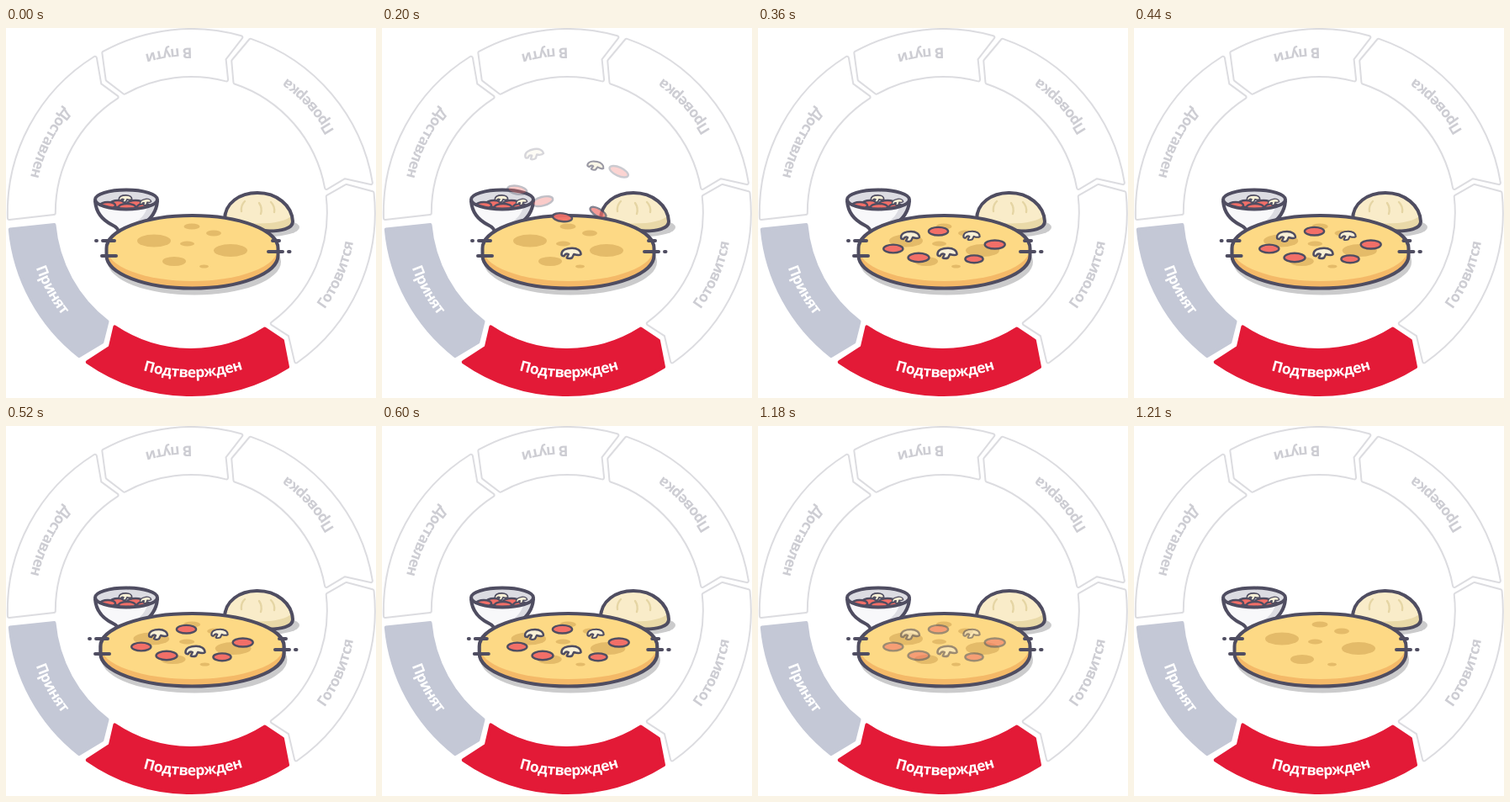
An HTML page that plays this animation: 440 px wide and 440 px high, repeating every 1.24 s.

```html
<!DOCTYPE html>
<html lang="ru">
<head>
<meta charset="utf-8">
<style>
html, body { margin: 0; width: 100%; height: 100%; overflow: hidden; background: #fff; }
svg { display: block; width: 100vw; height: 100vh; }
text { font: 700 17.4px "Open Sans", "Noto Sans", sans-serif; letter-spacing: -0.45px; text-anchor: middle; }
.ink { stroke: #4f4d61; stroke-width: 4; stroke-linecap: round; stroke-linejoin: round; }
.thin { stroke: #4f4d61; stroke-width: 2.4; stroke-linejoin: round; }
.red { fill: #f26f68; }
.cream { fill: #f8f0d6; }
.shadow { fill: #cbcbcc; }
.keep { vector-effect: non-scaling-stroke; }
</style>
</head>
<body>
<svg viewBox="0 0 440 440">
  <defs>
    <path id="line" d="M24.3 219.5A196 196 0 0 0 416.3 219.5"/>
    <path id="mushroom" class="cream thin" d="M-11 1C-11-4-5-6 1-6S11-3 11 1C9 3 6 2 3 1L1 5C-1 6-4 6-5 5L-3 1C-5 0-7 1-8 3C-10 3-11 2-11 1Z"/>
    <path id="bun" d="M260 228C260 208 278 196 299 196C322 196 340 211 341 230C341 239 326 241.500 313 241.500L275 238C264 236 260 232 260 228Z"/>
    <clipPath id="bunClip"><use href="#bun"/></clipPath>
    <clipPath id="bowlClip"><ellipse cx="143" cy="204" rx="37" ry="11.5"/></clipPath>
    <path id="base" d="M119.5 262A102 39 0 0 1 323.5 262V270.500A102 39 0 0 1 119.5 270.500Z"/>
  </defs>

  <g id="ring"></g>

  <g id="bowl">
    <ellipse class="shadow" cx="147" cy="232" rx="27" ry="7"/>
    <path d="M106 206C107 218 114 228 126 234Q134 238 134 243H155Q155 238 162 234C173 227 179 218 180 206Z" fill="#f8f8fa"/>
    <path d="M180 206C179 218 173 227 162 234H150C160 228 166 221 168 213Z" fill="#dcdce2"/>
    <path class="ink" d="M106 206C107 218 114 228 126 234Q134 238 134 243H155Q155 238 162 234C173 227 179 218 180 206" fill="none"/>
    <ellipse cx="143" cy="204" rx="37" ry="11.5" fill="#dcdce2"/>
    <g clip-path="url(#bowlClip)">
      <g class="red thin">
        <ellipse cx="133" cy="209" rx="9" ry="4"/>
        <ellipse cx="154" cy="209" rx="10" ry="4"/>
        <ellipse cx="121" cy="211" rx="9" ry="4"/>
        <ellipse cx="144" cy="213" rx="10" ry="4"/>
        <ellipse cx="164" cy="213" rx="8" ry="4"/>
      </g>
      <use href="#mushroom" transform="translate(142 203) scale(.7)"/>
      <use href="#mushroom" transform="translate(166 207) rotate(-10) scale(.6)"/>
    </g>
    <ellipse class="ink" cx="143" cy="204" rx="37" ry="11.5" fill="none"/>
  </g>

  <g id="dough">
    <ellipse class="shadow" cx="312" cy="237" rx="37" ry="11"/>
    <use href="#bun" fill="#f9ecc9"/>
    <path clip-path="url(#bunClip)" d="M344 218C338 231 314 234 285 232V246H348Z" fill="#e9d9a8"/>
    <path d="M284 206Q279 211 280 218M301 208Q305 214 303 221M315 207Q320 212 319 219" fill="none" stroke="#e5d5a4" stroke-width="2.4" stroke-linecap="round"/>
    <use href="#bun" class="ink" fill="none"/>
  </g>

  <g id="pizza">
    <ellipse class="shadow" cx="224" cy="278" rx="103" ry="39.5"/>
    <use href="#base" fill="#f4b968"/>
    <ellipse cx="221.5" cy="262" rx="102" ry="39" fill="#fdd985"/>
    <g fill="#e4bb69">
      <ellipse cx="176" cy="253" rx="20" ry="7.5"/>
      <ellipse cx="267" cy="264.5" rx="20" ry="7.5"/>
      <ellipse cx="200" cy="277.5" rx="14" ry="5.5"/>
      <ellipse cx="221" cy="236" rx="9.5" ry="3.6"/>
      <ellipse cx="247" cy="244" rx="9" ry="3.5"/>
      <ellipse cx="215.5" cy="256.5" rx="8.5" ry="3"/>
      <ellipse cx="235.5" cy="283.5" rx="5.5" ry="2"/>
    </g>
    <use href="#base" class="ink keep" fill="none"/>
  </g>
  <path id="left" class="ink" d="M107 253H108M115 253H129M114 271H131" fill="none"/>
  <path id="right" class="ink" d="M317 253H325M312 266H329M336 266H337.5" fill="none"/>
  <g id="toppings"></g>
</svg>

<script>
const LOOP = 1240, STEP = 40, REST = 680, FADE = 1180, CLEAR = 1210;
const CX = 220.3, CY = 219.5, R_IN = 163.5, R_MID = 187, R_OUT = 216.5;
const $ = id => document.getElementById(id);
const clamp = v => Math.max(0, Math.min(1, v));

function add(parent, tag, attrs) {
  const el = document.createElementNS("http://www.w3.org/2000/svg", tag);
  for (const k in attrs) el.setAttribute(k, attrs[k]);
  return parent.appendChild(el);
}

function at(r, deg) {
  const a = deg * Math.PI / 180;
  return (CX + r * Math.cos(a)).toFixed(2) + " " + (CY + r * Math.sin(a)).toFixed(2);
}

// Ring arrows run counterclockwise; a null end is cut straight.
function arrow(from, to) {
  const back = from === null
    ? [at(R_IN, 174.9), at(R_OUT, 174.7)]
    : [at(R_IN, from - 2.2), at(R_MID, from - 4.9), at(R_OUT, from - 1.2)];
  const front = to === null
    ? [at(R_OUT, 178.3), at(R_IN, 179.8)]
    : [at(R_OUT, to + 2), at(R_MID, to - 1.5), at(R_IN, to + 1.6)];
  return `M${back.join("L")}A${R_OUT} ${R_OUT} 0 0 0 ${front.join("L")}` +
    `A${R_IN} ${R_IN} 0 0 1 ${back[0]}Z`;
}

const GREY = "#c4c8d6", RED = "#e31a37", PALE = "#cdcdd3";
// label, label angle, start, end, solid colour
const stages = [
  ["Принят", 151, null, 126, GREY],
  ["Подтвержден", 89.4, 126, 56, RED],
  ["Готовится", 23.2, 56, -8.2],
  ["Проверка", -42.2, -8.2, -73],
  ["В пути", -98, -73, -120.7],
  ["Доставлен", -153.8, -120.7, null]
];
for (const [label, angle, from, to, solid] of stages) {
  const d = arrow(from, to), ring = $("ring");
  const layer = (color, width) => add(ring, "path", {
    d, fill: color, stroke: color, "stroke-width": width, "stroke-linejoin": "round"
  });
  if (solid) layer(solid, 4);
  else {
    layer("#dcdce0", 6);
    layer("#fff", 2);
  }
  const text = add(ring, "text", {
    fill: solid ? "#fff" : PALE, transform: `rotate(${angle - 90} ${CX} ${CY})`
  });
  add(text, "textPath", { href: "#line", startOffset: "50%" }).textContent = label;
}

// x, y, radius (0 = mushroom), scale, drop height, tilt, start, duration
const toppings = [
  [181, 248, 0, 1, 99, -10, 160, 180],
  [254, 247, 0, 0.88, 102, 15, 120, 140],
  [225, 268, 0, 1.05, 95, 12, 100, 100],
  [160.8, 262.5, 11.6, 1, 73, 10, 140, 170],
  [191, 273, 12.5, 1, 70, -15, 140, 170],
  [214.5, 241.7, 11.6, 1, 80, 35, 100, 108],
  [257, 274.8, 10.6, 1, 83, 45, 110, 130],
  [281.7, 257.5, 12, 1, 89, 25, 150, 170]
].map(([x, y, r, scale, drop, tilt, start, time]) => {
  const el = add($("toppings"), "g", {});
  if (r) add(el, "ellipse", { class: "red thin", rx: r, ry: r * 0.42 });
  else add(el, "use", { href: "#mushroom", transform: `scale(${scale})` });
  return { el, x, y, drop, tilt, start, time };
});

function draw(ms) {
  const t = Math.min(REST, Math.floor(ms / STEP) * STEP);
  for (const { el, x, y, drop, tilt, start, time } of toppings) {
    const p = t < 120 ? 0 : clamp((t - start) / time);
    const left = 1 - p ** 3;
    el.setAttribute("transform", `translate(${x} ${y - drop * left}) rotate(${tilt * left})`);
    el.setAttribute("opacity", p);
  }
  $("toppings").setAttribute("opacity", ms >= CLEAR ? 0 : ms >= FADE ? 0.55 : 1);

  const pulse = Math.sin(Math.PI * clamp((t - 370) / (REST - 370))) ** 2;
  const sx = 1 + pulse * 0.07;
  $("pizza").setAttribute("transform", `translate(221.5 0) scale(${sx} 1) translate(-221.5 0)`);
  $("left").setAttribute("transform", `translate(${-8 * pulse} 0)`);
  $("right").setAttribute("transform", `translate(${8 * pulse} 0)`);
}

const begin = performance.now();
function frame(now) {
  draw(Math.max(0, now - begin) % LOOP);
  requestAnimationFrame(frame);
}
draw(0);
requestAnimationFrame(frame);
</script>
</body>
</html>
```
